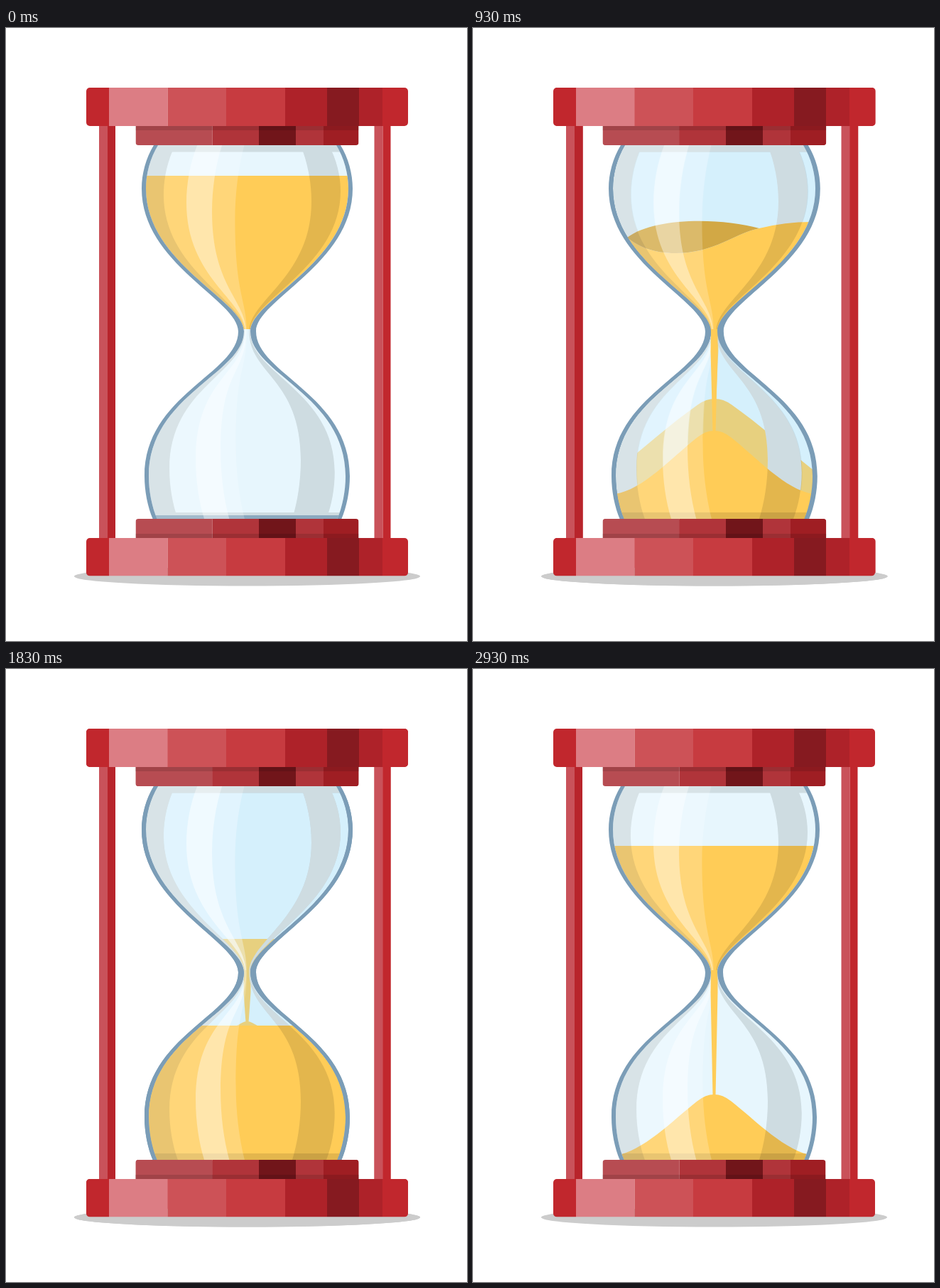
Write an HTML page with a canvas that moves like this. It is 649 by 863 pixels and loops after 3230 ms.

```html
<!DOCTYPE html>
<html lang="en">
<head>
<meta charset="utf-8">
<title>Hourglass</title>
<style>
  html, body { margin: 0; width: 100%; height: 100%; overflow: hidden; background: #fff; }
  canvas { display: block; }
</style>
</head>
<body>
<canvas id="stage" width="649" height="863"></canvas>
<script>
const ctx = document.getElementById('stage').getContext('2d');
const CX = 339.5, NECK = 427, NECK_R = 4.5;
const SAND = '#ffcc57', DARK_SAND = '#d2a845', RIM = '#7b9db7';

// end: y of the open end, rim: half width there, y and r: widest place, pull: curve handles
const UPPER = { end: 165, rim: 125.5, y: 226, r: 142.5, pull: [106, 44] };
const LOWER = { end: 692, rim: 126.5, y: 631, r: 138.5, pull: [115, 60] };

const lerp = (a, b, t) => a + (b - a) * t;

// A meridian of one bulb from its end to the neck; k runs from -1 (left wall) to 1 (right wall).
// Inner meridians bulge nearer to the neck.
function meridian(k, bulb, grow) {
  const side = Math.sign(k), size = Math.abs(k), depth = 1 - size;
  const dir = Math.sign(NECK - bulb.y);
  const y = bulb.y + dir * 50 * depth;
  const r = size * bulb.r + grow;
  const rim = (size - .1 * depth) * bulb.rim + grow;
  const neck = size * NECK_R + grow * 4 / 3;
  return [
    [rim, bulb.end],
    [lerp(rim, r, .65), lerp(bulb.end, y, .3)],
    [r, lerp(bulb.end, y, .66)],
    [r, y],
    [r, y + dir * bulb.pull[0]],
    [neck, NECK - dir * bulb.pull[1]],
    [neck, NECK]
  ].map(([x, py]) => [CX + side * x, py]);
}

function edge(upper, lower = upper, grow = 0) {
  const below = meridian(lower, LOWER, grow).reverse().slice(1);
  return [...meridian(upper, UPPER, grow), ...below];
}

function band(left, right) {
  const curve = ([first, ...rest]) => `${first}C${rest.join(' ')}`;
  return `M${curve(left)}L${curve([...right].reverse())}Z`;
}

const wall = edge(-1);
const inside = band(wall, edge(1));
const glass = new Path2D(inside);
const rim = new Path2D(inside + band(edge(-1, -1, 6), edge(1, 1, 6)));
const shade = new Path2D(band(wall, edge(-.825, -.79)) + band(edge(.635, .545), edge(.923, .89)));
const ends = new Path2D('M190 165H490V174.5H190ZM190 682H490V692H190Z');
const sheen = new Path2D(band(wall, edge(-.12, -.115)));
const gleam = new Path2D(band(edge(-.6, -.523), edge(-.347, -.27)));

const flat = (y, bottom) => `M190 ${y}H490V${bottom}H190Z`;

// A symmetric heap: foot is its depth at the wall, lift the steepness there,
// pitch the slope near the top and round the half width of the blunt tip.
function heap(peak, foot, lift = 6, pitch = .79, round = 24) {
  const blunt = round * pitch / 2;
  const slope = [
    [139.5, foot],
    [100, foot - lift],
    [60, blunt + (60 - round) * pitch],
    [round, blunt]
  ];
  const at = side => slope.map(([x, y]) => [CX + side * x, peak + y]);
  const [l0, l1, l2, l3] = at(-1), [r0, r1, r2, r3] = at(1);
  return `M${l0}C${l1} ${l2} ${l3}Q${CX} ${peak - blunt} ${r3}C${r2} ${r1} ${r0}V700H${l0[0]}Z`;
}

// A wavy surface: the far slope hangs between left and meet, its lowest point is dip.
function wave(left, crest, meet, dip, right) {
  const [lx, ly] = left, [mx, my] = meet, [dx, dy] = dip;
  const cy = (8 * crest - ly - my) / 6;
  const back = `C${lerp(lx, mx, .2)} ${cy} ${lerp(lx, mx, .7)} ${cy} ${meet}`;
  const front = `C${lerp(mx, dx, .28)} ${my + 6} ${lerp(mx, dx, .53)} ${dy} ${dip}` +
    `C${lerp(dx, lx, .45)} ${dy} ${lerp(dx, lx, .75)} ${lerp(dy, ly, .4)} ${left}`;
  return {
    hollow: `M${left}${back}${front}Z`,
    top: `M${meet}${front}V426H${right[0]}V${right[1]}Q${(mx + right[0]) / 2} ${right[1]} ${meet}Z`
  };
}

// top: sand above the neck, hollow: its far slope, pile: sand below, peak: where the stream lands
const states = [
  { top: flat(208, 424) },
  { top: flat(249, 426), pile: heap(599, 86), peak: 599 },
  { ...wave([217, 295], 272, [403, 282], [285, 317], [476, 273]), pile: heap(567, 89), peak: 567 },
  {
    ...wave([242, 328], 319.5, [408, 326], [270, 349], [445, 322]),
    pile: heap(522, 101, 32, .7), peak: 522, shift: .8
  },
  { top: flat(380, 426), pile: heap(496, 65, 16, .55, 7), peak: 496 },
  { pile: flat(502, 700) }
];

for (const s of states) {
  const { top = '', pile = '', hollow = '' } = s;
  s.sand = new Path2D(top + pile);
  s.far = new Path2D(hollow);
  s.grains = new Path2D(hollow);
  s.grains.addPath(s.sand);
  s.stream = new Path2D(s.peak ? `M335 424L334.5 455L337.5 ${s.peak + 2}H341.5L344.5 455V424Z` : '');
}

function fill(path, color, rule = 'nonzero') {
  ctx.fillStyle = color;
  ctx.fill(path, rule);
}

function box(x0, y0, x1, y1, color) {
  ctx.fillStyle = color;
  ctx.fillRect(x0, y0, x1 - x0, y1 - y0);
}

// A rounded bar made of flat facets; each facet is [right edge, colour].
function bar(x, y0, y1, radii, facets) {
  const end = facets[facets.length - 1][0];
  ctx.save();
  ctx.beginPath();
  ctx.roundRect(x, y0, end - x, y1 - y0, radii);
  ctx.clip();
  for (const [right, color] of facets) {
    box(x, y0, right, y1, color);
    x = right;
  }
  ctx.restore();
}

const SLAB = [[145, '#c1272d'], [227.5, '#dc7d84'], [310, '#cd5257'], [393, '#c73b40'],
  [452, '#ae2229'], [497, '#861a20'], [530, '#ae2229'], [566, '#c1272d']];
const PLATE = [[290.5, '#b74c52'], [356, '#b0343a'], [408, '#71151a'], [447, '#b0343a'], [496.5, '#9f1e23']];

function post(x, dark) {
  box(x, 138, x + 12, 718, '#c9525a');
  box(x + 12, 138, x + 23, 718, dark);
}

function drawFrame() {
  ctx.fillStyle = '#ccc';
  ctx.beginPath();
  ctx.ellipse(CX, 772, 243.5, 13.5, 0, 0, 2 * Math.PI);
  ctx.fill();
  post(131, '#b8242b');
  post(518.5, '#c1272d');
  bar(182.5, 138, 165, [0, 0, 4, 4], PLATE);
  bar(182.5, 691, 718, [4, 4, 0, 0], PLATE);
  for (const y of [138, 712]) box(182.5, y, 496.5, y + 6, 'rgba(0,0,0,.12)');
  bar(113, 84, 138, 5, SLAB);
  bar(113, 718, 771.5, 5, SLAB);
}

function drawGlass(s) {
  ctx.save();
  ctx.clip(glass);
  fill(glass, 'rgba(159,219,247,.25)');
  for (const path of [shade, ends]) fill(path, '#cedce1');
  box(190, 686, 490, 692, 'rgba(123,157,183,.8)');
  fill(s.sand, SAND);
  fill(s.far, DARK_SAND);
  ctx.save();
  ctx.clip(s.grains);
  for (const path of [shade, ends]) fill(path, 'rgba(0,0,0,.11)');
  ctx.restore();
  fill(sheen, 'rgba(255,255,255,.2)');
  fill(gleam, 'rgba(255,255,255,.38)');
  fill(s.stream, SAND);
  ctx.restore();
  fill(rim, RIM, 'evenodd');
}

function drawLayer(s) {
  ctx.save();
  ctx.translate(s.shift || 0, 0);
  drawGlass(s);
  drawFrame();
  ctx.restore();
}

const order = [0, 1, 2, 3, 4, 5, 4, 3, 2, 1];
const LOOP = 3230;

// Each state stands alone for a moment, then the next one shows through beneath it.
function render(t) {
  let step = 0, overlap = t >= 330;
  if (t >= 500) {
    step = Math.max(1, Math.floor((t - 230) / 300));
    overlap = t >= 630 && step < 9 && (t - 230) % 300 >= 100;
  }
  box(0, 0, 649, 863, '#fff');
  if (overlap) drawLayer(states[order[step + 1]]);
  drawLayer(states[order[step]]);
}

const begin = performance.now();
function tick() {
  render((performance.now() - begin) % LOOP);
  requestAnimationFrame(tick);
}
tick();
</script>
</body>
</html>
```
